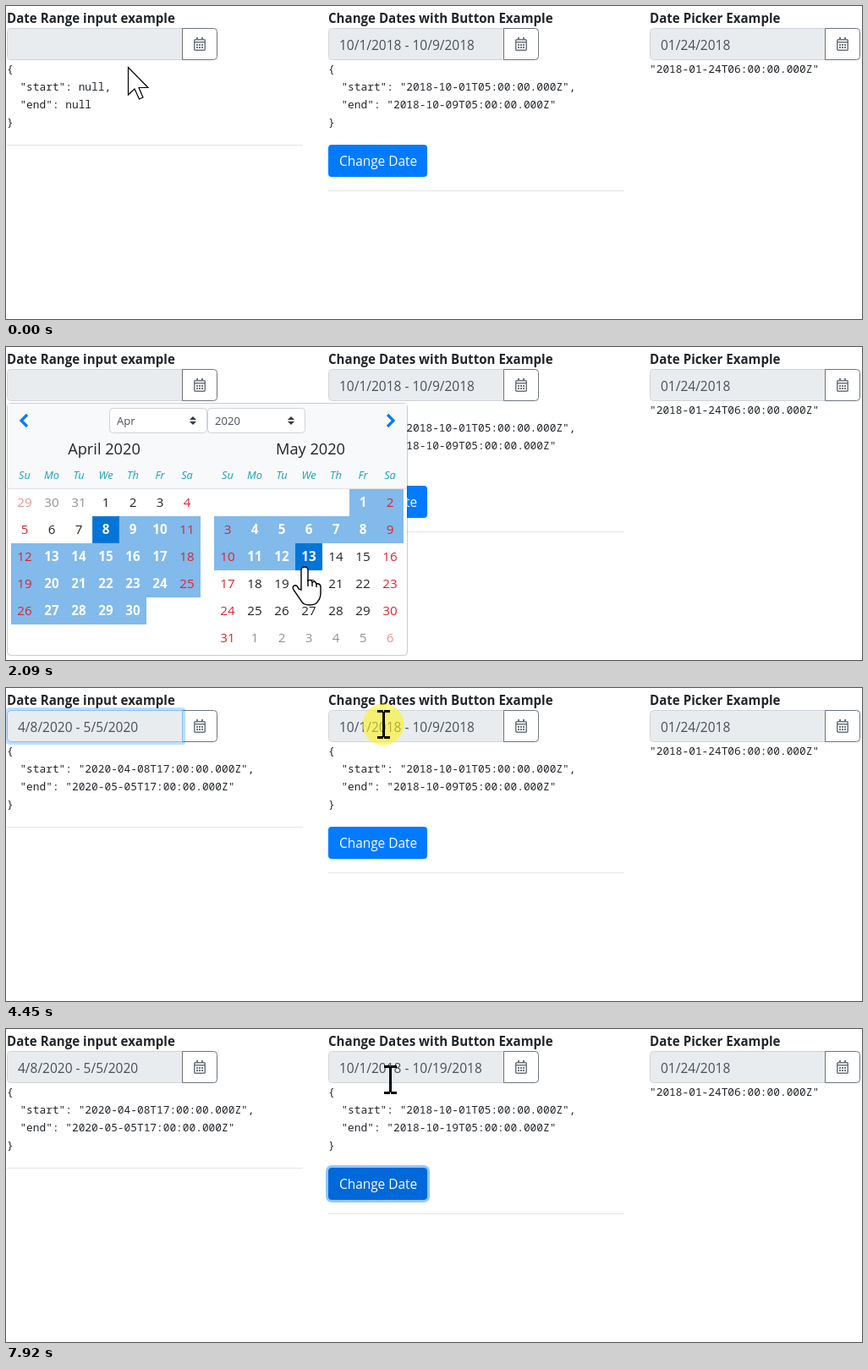
An HTML page with a canvas that plays this animation: 1012x370 px, repeating every 8 s.

```html
<!DOCTYPE html>
<html lang="en">
<head>
<meta charset="utf-8">
<title>Date picker examples</title>
<style>
html, body { margin: 0; width: 100%; height: 100%; overflow: hidden; background: #fff }
canvas { display: block }
</style>
</head>
<body>
<canvas id="stage" width="1012" height="370"></canvas>
<script>
const ctx = document.getElementById('stage').getContext('2d');
const LOOP = 8000, DAY = 864e5, CELL = 32, TICK = 80, FADE = 2 * TICK;
const SANS = '"Open Sans", "Noto Sans", sans-serif';
const MONO = '"Noto Sans Mono", "DejaVu Sans Mono", monospace';
const MONTHS = ['January', 'February', 'March', 'April', 'May', 'June', 'July',
  'August', 'September', 'October', 'November', 'December'];
const WEEKDAYS = ['Su', 'Mo', 'Tu', 'We', 'Th', 'Fr', 'Sa'];
const INK = '#212529', GRAY = '#495057', BLUE = '#007bff', RED = '#d9262c', RULE = '#e5e5e5';
const BUTTON = [381, 164, 117, 38];
const COLUMNS = [1, 381, 761];

const day = (y, m, d) => Date.UTC(y, m, d) / DAY;
const ramp = (t, start) => Math.min(1, Math.max(0, (t - start) / FADE));
const flash = (t, start) => t < start ? 0 : (1 - ramp(t, start)) ** 2;
const inside = ([px, py], x, y, w, h) => px >= x && px < x + w && py >= y && py < y + h;

// Moments of the mouse clicks
const click = { openFirst: 630, pickStart: 1390, pickEnd: 2560, openSecond: 4450, leave: 5760, button: 6640 };

const popups = [
  { x: COLUMNS[0], open: click.openFirst, close: click.pickEnd, year: 2020, month: 3,
    from: day(2020, 3, 8), pick: click.pickStart },
  { x: COLUMNS[1], open: click.openSecond, close: click.leave, year: 2018, month: 9,
    from: day(2018, 9, 1), to: day(2018, 9, 9), pick: 0 }
];

// Pointer moves: start and end time, goal, and the point that bends the way there
const HOME = [144, 72];
const moves = [
  [80, 470, [100, 51], [230, 50]],
  [790, 1230, [120, 222]],
  [1470, 1610, [129, 238]],
  [1690, 2170, [390, 261]],
  [2240, 2410, [329, 228]],
  [3110, 3900, [446, 43], [67, 90]],
  [5070, 5450, [454, 41], [455, 102]],
  [6150, 6410, [424, 190]],
  [7280, 7770, [451, 66]],
  [7920, 7920, [454, 60]]
];

const arrow = new Path2D('M0 0V32.5L7.5 25.5L13 37.5L17.5 35.5L12.5 24H23.5Z');
const hand = new Path2D('M-4 27V4a4 4 0 0 1 8 0V16q4-2 5 2q4-2 5 2q4-1 5 3v7q0 7-3 10q-2 5-10 5t-10-5l-9-13q-2-4 1-5t5 4z');
const knuckles = new Path2D('M4 15v8M9 18v5M14 20v4');

function text(s, x, y, size, color = INK, style = '', align = 'left', family = SANS) {
  ctx.font = `${style} ${size}px ${family}`;
  ctx.fillStyle = color;
  ctx.textAlign = align;
  ctx.fillText(s, x, y);
}

function rect(x, y, w, h, color) {
  ctx.fillStyle = color;
  ctx.fillRect(x, y, w, h);
}

function round(x, y, w, h, radius, color) {
  ctx.beginPath();
  ctx.roundRect(x, y, w, h, radius);
  ctx.fillStyle = color;
  ctx.fill();
}

// Bordered box; the fill stays inside the border
function box(x, y, w, h, radius, fill, border) {
  round(x + 1, y + 1, w - 2, h - 2, radius, fill);
  ctx.beginPath();
  ctx.roundRect(x + .5, y + .5, w - 1, h - 1, radius);
  ctx.lineWidth = 1;
  ctx.strokeStyle = border;
  ctx.stroke();
}

function triangle(x, y, dir) {
  ctx.beginPath();
  ctx.moveTo(x - 4, y);
  ctx.lineTo(x, y + 4 * dir);
  ctx.lineTo(x + 4, y);
  ctx.fillStyle = '#343a40';
  ctx.fill();
}

function chevron(x, dir) {
  ctx.beginPath();
  ctx.moveTo(x + 7 * dir, 80);
  ctx.lineTo(x, 87);
  ctx.lineTo(x + 7 * dir, 94);
  ctx.strokeStyle = BLUE;
  ctx.lineWidth = 3.2;
  ctx.stroke();
}

function glow(x, y, w, h, radii, color) {
  ctx.beginPath();
  ctx.roundRect(x - 3, y - 3, w + 6, h + 6, radii.map(r => r + 3));
  ctx.roundRect(x, y, w, h, radii);
  ctx.fillStyle = color;
  ctx.fill('evenodd');
}

function calendarIcon(x, y) {
  const color = '#6c757d';
  ctx.strokeStyle = color;
  ctx.lineWidth = 1.5;
  ctx.beginPath();
  ctx.roundRect(x + .75, y + 2.75, 12.5, 12.5, 1);
  ctx.stroke();
  rect(x + 1, y + 5, 12, 1.5, color);
  for (const px of [3, 9]) rect(x + px, y, 2, 3, color);
  for (const px of [3, 6, 9]) for (const py of [8, 11]) rect(x + px, y + py, 2, 2, color);
}

function field(x, title, value, focus = 0) {
  const radii = [4, 0, 0, 4];
  text(title, x, 20, 15.1, INK, 'bold');
  box(x, 26, 208, 38, radii, '#e9ecef', '#ced4da');
  box(x + 207, 26, 42, 38, [0, 4, 4, 0], '#fff', '#6c757d');
  calendarIcon(x + 221, 37);
  ctx.globalAlpha = focus;
  glow(x, 26, 208, 38, radii, 'rgba(0,123,255,.25)');
  box(x, 26, 208, 38, radii, '#e9ecef', '#80bdff');
  ctx.globalAlpha = 1;
  text(value, x + 13, 52, 15.5, GRAY);
}

function code(x, ...lines) {
  lines.forEach((s, i) => text(s, x, 79 + 21 * i, 12.83, INK, '', 'left', MONO));
}

const rangeCode = (x, start, end) => code(x, '{', `  "start": ${start},`, `  "end": ${end}`, '}');

function select(x, label) {
  box(x, 72, 116, 30, 4, '#fff', '#ced4da');
  text(label, x + 9, 92, 13.1, GRAY);
  triangle(x + 99, 86, -1);
  triangle(x + 99, 88, 1);
}

function monthCells(p, m) {
  const first = day(p.year, p.month + m, 1), last = day(p.year, p.month + m + 1, 0);
  const offset = new Date(first * DAY).getUTCDay();
  const cells = [];
  for (let i = 0; i < 42; i++) {
    const date = first - offset + i;
    if (m ? date < first : date > last) continue;
    cells.push({ date, outside: date < first || date > last, weekend: i % 7 % 6 === 0,
      x: p.x + 5 + 240 * m + CELL * (i % 7), y: 168 + CELL * Math.floor(i / 7) });
  }
  return cells;
}

function drawCell(c, solid, faded, start) {
  if (solid || faded) rect(c.x, c.y, CELL, CELL, solid ? '#0275d8' : '#81baeb');
  if (start) {
    ctx.strokeStyle = '#1a80e2';
    ctx.lineWidth = 1;
    ctx.strokeRect(c.x + .5, c.y + .5, CELL - 1, CELL - 1);
  }
  const marked = solid || (faded && !c.weekend);
  ctx.globalAlpha = c.outside ? .5 : 1;
  text(new Date(c.date * DAY).getUTCDate(), c.x + 16, c.y + 21, 15.2,
    marked ? '#fff' : c.weekend ? RED : INK, marked ? 'bold' : '', 'center');
  ctx.globalAlpha = 1;
}

function drawPopup(p, t, pos) {
  const { x } = p;
  box(x, 66, 474, 299, 4, '#fff', 'rgba(0,0,0,.2)');
  rect(x + 1, 67, 472, 100, '#f8f9fa');
  rect(x + 1, 167, 472, 1, '#dfe1e3');
  chevron(x + 17, 1);
  chevron(x + 457, -1);
  select(x + 121, MONTHS[p.month].slice(0, 3));
  select(x + 237, p.year);
  for (const m of [0, 1]) {
    text(`${MONTHS[p.month + m]} ${p.year}`, x + 115 + 244 * m, 127, 18.2, INK, '', 'center');
    WEEKDAYS.forEach((name, i) =>
      text(name, x + 21 + 240 * m + CELL * i, 156, 12.8, '#17a2b8', 'italic', 'center'));
  }

  const cells = [0, 1].flatMap(m => monthCells(p, m));
  const hover = cells.find(c => inside(pos, c.x, c.y, CELL, CELL));
  const from = t >= p.pick ? p.from : NaN;
  const to = p.to ?? hover?.date;
  for (const c of cells) {
    const start = c.date === from;
    drawCell(c, start || c === hover || c.date === p.to, c.date > from && c.date < to, start);
  }
}

// Moves advance in ticks along a quadratic curve
function pointerAt(t) {
  let pos = HOME;
  for (const [start, end, goal, bend] of moves) {
    if (t < start) break;
    const steps = Math.round((end - start) / TICK) + 1;
    const f = t >= end ? 1 : (1 + Math.floor((t - start) / TICK)) / steps;
    pos = pos.map((a, k) => {
      const via = bend ? bend[k] : (a + goal[k]) / 2;
      return Math.round((1 - f) ** 2 * a + 2 * f * (1 - f) * via + f * f * goal[k]);
    });
  }
  return pos;
}

function pointerKind(pos, popup) {
  if (COLUMNS.some(x => inside(pos, x, 26, 208, 38))) return 'beam';
  if (popup && inside(pos, popup.x, 66, 474, 299)) return pos[1] >= 168 ? 'hand' : 'arrow';
  return inside(pos, ...BUTTON) ? 'hand' : 'arrow';
}

function outline(shape, width) {
  ctx.fillStyle = '#fff';
  ctx.strokeStyle = '#000';
  ctx.lineWidth = width;
  ctx.fill(shape);
  ctx.stroke(shape);
}

function drawPointer([x, y], kind) {
  ctx.save();
  ctx.translate(x, y);
  if (kind === 'beam') {
    rect(-1, -15, 3, 30, '#000');
    for (const by of [-17, 14]) for (const bx of [-7, 1]) rect(bx, by, 7, 3, '#000');
  } else if (kind === 'hand') {
    ctx.translate(0, 2);
    outline(hand, 1.4);
    ctx.stroke(knuckles);
  } else {
    ctx.translate(.5, .5);
    outline(arrow, 1.2);
  }
  ctx.restore();
}

function draw(t) {
  const pos = pointerAt(t);
  const popup = popups.find(p => t >= p.open + TICK && t < p.close + TICK);
  const chosen = t >= click.pickEnd + TICK, changed = t >= click.button + TICK;
  const pressed = ramp(t, click.button);
  rect(0, 0, 1012, 370, '#fff');

  const [first, second, third] = COLUMNS;
  field(first, 'Date Range input example', chosen ? '4/8/2020 - 5/5/2020' : '',
    Math.max(flash(t, click.pickEnd + TICK), flash(t, click.openSecond)));
  if (chosen) rangeCode(first, '"2020-04-08T17:00:00.000Z"', '"2020-05-05T17:00:00.000Z"');
  else rangeCode(first, null, null);
  rect(first, 164, 350, 1, RULE);

  const end = changed ? '19' : '9';
  field(second, 'Change Dates with Button Example', `10/1/2018 - 10/${end}/2018`,
    ramp(t, click.leave) * (1 - pressed));
  rangeCode(second, '"2018-10-01T05:00:00.000Z"', `"2018-10-${end.padStart(2, '0')}T05:00:00.000Z"`);
  rect(second, 218, 350, 1, RULE);
  glow(...BUTTON, [4, 4, 4, 4], `rgba(38,143,255,${pressed / 2})`);
  const hot = changed || (!popup && inside(pos, ...BUTTON));
  round(...BUTTON, 4, hot ? '#0069d9' : BLUE);
  text('Change Date', second + 13, 189, 15.4, '#fff');

  field(third, 'Date Picker Example', '01/24/2018');
  code(third, '"2018-01-24T06:00:00.000Z"');

  if (popup) drawPopup(popup, t, pos);
  if (Object.values(click).some(at => t >= at && t < at + FADE)) {
    ctx.beginPath();
    ctx.arc(...pos, 24.5, 0, 2 * Math.PI);
    ctx.fillStyle = 'rgba(255,245,20,.57)';
    ctx.fill();
  }
  drawPointer(pos, pointerKind(pos, popup));
}

let begin;
function frame(now) {
  begin ??= now;
  draw((now - begin) % LOOP);
  requestAnimationFrame(frame);
}
draw(0);
requestAnimationFrame(frame);
</script>
</body>
</html>
```
